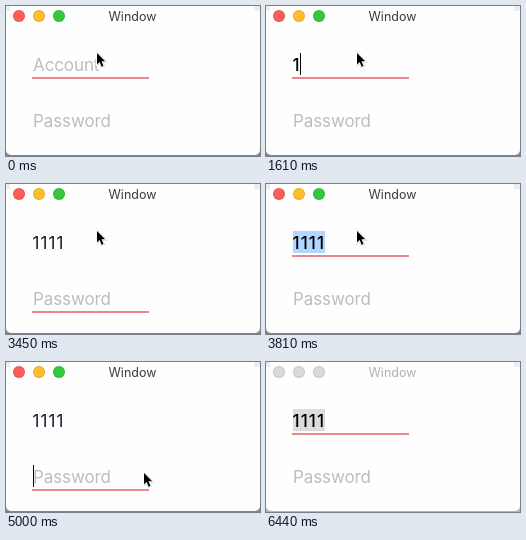
An HTML page that plays this animation: 254 by 150 pixels, repeating every 6540 ms.

```html
<!DOCTYPE html>
<html lang="en">
<head>
<meta charset="utf-8">
<title>Login window</title>
<style>
  html, body { margin: 0; width: 100%; height: 100%; overflow: hidden; }
  body { position: relative; background: #ececec; font: 17px/22px Inter, "Open Sans", sans-serif; }
  body * { position: absolute; box-sizing: border-box; animation: 6540ms step-end infinite; }

  .shade { left: 0; top: 75px; width: 254px; height: 75px; background: #858585; animation-name: shade; }
  .window { left: 0; top: 0; width: 254px; height: 149px; background: #fefefe; border-radius: 5px; }
  .corner { top: 0; height: 5px; background: #ececec; }
  .light { top: 4px; width: 12px; height: 12px; border-radius: 50%; box-shadow: inset 0 0 0 1px rgba(0, 0, 0, .1); animation-name: fade-light; }
  .title { left: 0; width: 253px; top: 1px; font-size: 12.5px; line-height: 20px; text-align: center; color: #3c3c3c; animation-name: fade-title; }

  .hint { left: 27px; color: #bdbdbd; letter-spacing: -.1px; }
  .account { top: 48px; animation-name: account-hint; }
  .password { top: 104px; }
  .selection { left: 27px; top: 47px; width: 32px; height: 22px; background: #b2d7fe; opacity: 0; animation-name: select; }
  .typed { left: 26.5px; top: 48px; width: 0; height: 22px; overflow: hidden; white-space: nowrap; letter-spacing: 1.1px; animation-name: type, emphasis; }
  .line { left: 26px; top: 71px; width: 117px; height: 2px; background: #ef868f; animation-name: focus; }
  .caret { left: 27px; top: 47px; width: 1px; height: 22px; background: #000; opacity: 0; animation-name: caret; }
  .cursor { left: 89px; top: 44px; width: 13px; height: 20px; filter: drop-shadow(0 .5px .7px rgba(0, 0, 0, .5)); animation-name: leave; }

  @keyframes shade { 98.471% { background: #b4b4b4; } }
  @keyframes fade-light { 98.471% { background: #dadada; } }
  @keyframes fade-title { 98.471% { color: #b0b0b0; } }
  @keyframes account-hint { 24.618%, 100% { opacity: 0; } }
  @keyframes type {
    0% { width: 0; }
    24.618% { width: 8px; }
    27.217% { width: 16px; }
    30.887% { width: 24px; }
    38.991%, 100% { width: 34px; }
  }
  @keyframes emphasis {
    0%, 58.257%, 83.792%, 100% { font-weight: 500; color: #000; }
    44.495%, 70.031% { font-weight: 400; color: #10182c; }
  }
  @keyframes focus {
    0%, 58.257%, 83.792%, 100% { transform: none; }
    44.495%, 70.031% { transform: translateY(56px); }
  }
  @keyframes select {
    0%, 44.495%, 70.031% { opacity: 0; }
    58.257%, 83.792% { opacity: 1; background: #b2d7fe; }
    98.471%, 100% { opacity: 1; background: #dcdcdc; }
  }
  @keyframes caret {
    0%, 16.361%, 52.752%, 58.257%, 78.287%, 100% { opacity: 0; transform: none; }
    8.257% { opacity: 1; transform: none; }
    24.618% { opacity: 1; transform: translateX(7px); }
    27.217% { opacity: 1; transform: translateX(15px); }
    30.887% { opacity: 1; transform: translateX(23px); }
    38.991% { opacity: 1; transform: translateX(31px); }
    44.495%, 70.031% { opacity: 1; transform: translateY(56px); }
  }
  @keyframes leave {
    0% { transform: none; }
    73.7% { transform: translate(5px, 8px); }
    74.847% { transform: translate(22px, 31px); }
    75.994% { transform: translate(47px, 64px); }
    77.141% { transform: translate(72px, 95px); }
    78.287%, 100% { transform: translate(100px, 130px); }
  }
</style>
</head>
<body>
  <div class="shade"></div>
  <div class="window"></div>
  <i class="corner" style="left:0;width:4px"></i>
  <i class="corner" style="right:0;width:6px"></i>
  <i class="light" style="left:7px;background:#fb5f57"></i>
  <i class="light" style="left:27px;background:#fdbd2f"></i>
  <i class="light" style="left:47px;background:#35c83e"></i>
  <div class="title">Window</div>
  <div class="selection"></div>
  <div class="hint account">Account</div>
  <div class="typed">1111</div>
  <div class="hint password">Password</div>
  <div class="line"></div>
  <div class="caret"></div>
  <svg class="cursor" viewBox="0 0 13 20">
    <path d="M2 3V14.4L4.7 11.9L6.6 16.8L8.5 16L6.5 11.2H10.2Z" fill="#000" stroke="#fff" stroke-width="2" paint-order="stroke"/>
  </svg>
</body>
</html>
```
